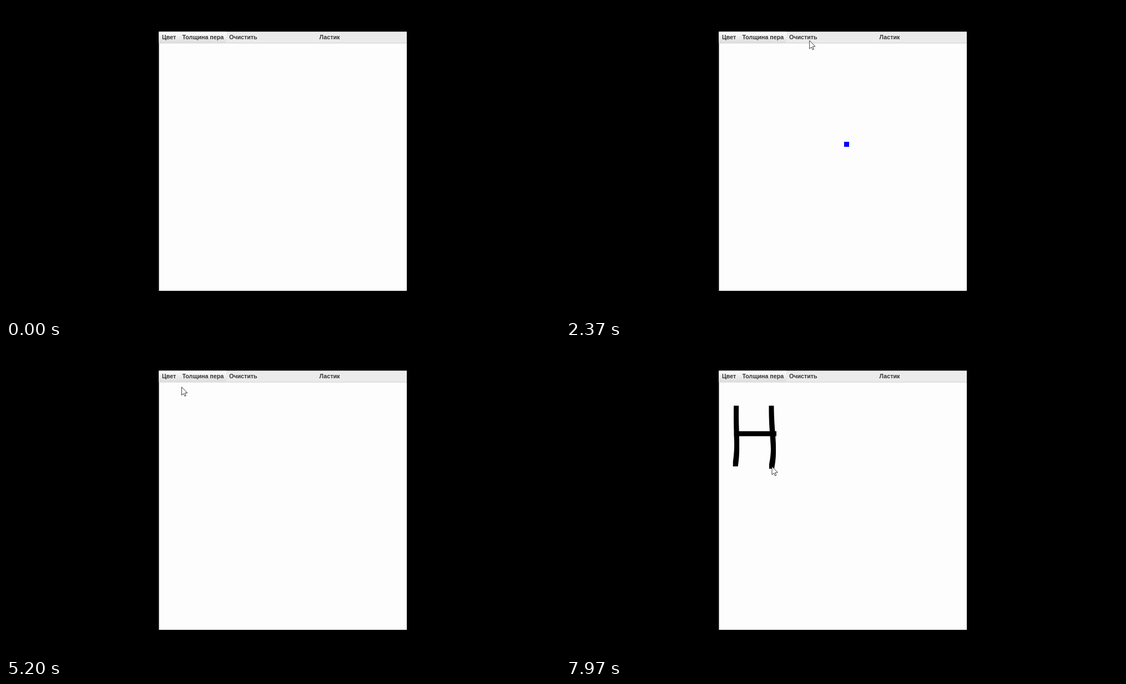
Animation, 998 px wide and 561 px high, one loop 8 s. Source, as an HTML page:

```html
<!DOCTYPE html>
<html lang="ru">
<head>
<meta charset="utf-8">
<title>Рисовалка</title>
<style>
  html, body { margin: 0; width: 100%; height: 100%; overflow: hidden; background: #000; }
  svg { display: block; width: 998px; height: 561px; }
  text { font: bold 10.7px "Liberation Sans", Arial, sans-serif; fill: #333; }
</style>
</head>
<body>
<svg viewBox="0 0 998 561">
  <defs>
    <linearGradient id="shine" x2="0" y2="1">
      <stop offset="0" stop-color="#fff"/>
      <stop offset=".35" stop-color="#f3f3f3"/>
      <stop offset="1" stop-color="#dedede"/>
    </linearGradient>
  </defs>
  <rect width="998" height="561"/>
  <rect x="275.5" y="46.5" width="446.5" height="467.3" fill="#fdfdfd"/>
  <rect x="275.5" y="46.5" width="446.5" height="20.5" fill="#ebebeb"/>
  <rect x="275.5" y="46.5" width="121.5" height="19.5" fill="url(#shine)"/>
  <rect x="275.5" y="66.5" width="446.5" height="1" fill="#d0d0d0"/>
  <rect id="dot" x="501" y="245" width="9" height="9" fill="#00f"/>
  <path id="ink"/>
  <g id="menu">
    <rect x="275.5" y="46.5" width="35.5" height="19.5" fill="#a0b5ca"/>
    <path d="M310.5 47v19" stroke="#7a8a99"/>
    <rect x="276" y="66.5" width="67.7" height="97" fill="#eee" stroke="#7f96bd"/>
    <g id="active">
      <rect x="276.5" y="68" width="67" height="18" fill="#a0b5ca"/>
      <path d="M276.5 68.5h67" stroke="#7f96bd"/>
    </g>
  </g>
  <g id="labels"></g>
  <g id="items"></g>
  <path id="cursor" fill="#fff" stroke="#222" stroke-width=".9" stroke-linejoin="round"
    d="M0 0V14.8L3.4 11.7 5.6 16.6 7.8 15.6 5.7 11 10.3 10.6Z"/>
</svg>
<script>
const LOOP = 8000;
const CLEAR = 2600, MENU_OPEN = 4380, MENU_CLOSE = 5150;
const BRUSH = 9;

// Where the hand is at each moment; pen marks a drawn stretch, sway bends it sideways
const stops = [
  { at: 670, x: 700, y: 420 },
  { at: 930, x: 505.5, y: 249.5 },
  { at: 1500, x: 325.5, y: 93.5 },
  { at: 1850, x: 330, y: 130 },
  { at: 2300, x: 438, y: 62 },
  { at: 2930, x: 444, y: 58 },
  { at: 3230, x: 444, y: 58 },
  { at: 3630, x: 431.5, y: 78.5 },
  { at: 4350, x: 291, y: 58 },
  { at: 4600, x: 313.5, y: 70.5 },
  { at: 5150, x: 316, y: 75 },
  { at: 6120, x: 306.7, y: 114 },
  { at: 6470, x: 305.3, y: 214.5, pen: true, sway: 1.9 },
  { at: 6680, x: 307, y: 160 },
  { at: 7030, x: 374.5, y: 160, pen: true },
  { at: 7310, x: 370, y: 114 },
  { at: 7970, x: 370.5, y: 218.8, pen: true, sway: 3.2 }
];
const [ENTER, CLICK] = stops.map(s => s.at);

const byId = id => document.getElementById(id);
const show = (id, on) => byId(id).setAttribute("visibility", on ? "visible" : "hidden");
const clamp = v => Math.min(1, Math.max(0, v));
const ease = k => k * k * (3 - 2 * k);

function addText(parent, label, x, y) {
  const node = document.createElementNS("http://www.w3.org/2000/svg", "text");
  node.setAttribute("x", x);
  node.setAttribute("y", y);
  node.textContent = label;
  byId(parent).append(node);
}

function pointOn(from, to, k) {
  const bend = (to.sway || 0) * Math.sin(Math.PI * k * k);
  return [from.x + (to.x - from.x) * k + bend, from.y + (to.y - from.y) * k];
}

const progress = (from, to, t) => ease(clamp((t - from.at) / (to.at - from.at)));

function pointerAt(t) {
  const next = stops.findIndex(s => s.at > t);
  const i = next < 0 ? stops.length - 1 : Math.max(1, next);
  return pointOn(stops[i - 1], stops[i], progress(stops[i - 1], stops[i], t));
}

// Sweeps the square brush along every pen stretch reached so far
function inkAt(t) {
  let d = "";
  stops.forEach((to, i) => {
    const from = stops[i - 1];
    if (!to.pen || t < from.at) return;
    const end = progress(from, to, t);
    const steps = Math.ceil(end * 100);
    for (let n = 0; n <= steps; n++) {
      const [x, y] = pointOn(from, to, Math.min(end, n / 100));
      d += `M${x - BRUSH / 2} ${y - BRUSH / 2}h${BRUSH}v${BRUSH}h-${BRUSH}z`;
    }
  });
  return d;
}

function draw(t) {
  const [x, y] = pointerAt(t);
  const open = t >= MENU_OPEN && t < MENU_CLOSE;
  show("dot", t >= CLICK && t < CLEAR);
  show("menu", open);
  show("items", open);
  show("active", open && y >= 67);
  show("cursor", t >= ENTER);
  byId("ink").setAttribute("d", inkAt(t));
  byId("cursor").setAttribute("transform", `translate(${x + 0.5} ${y + 0.5})`);
}

[["Цвет", 281], ["Толщина пера", 317.5], ["Очистить", 402], ["Ластик", 564.5]]
  .forEach(([label, x]) => addText("labels", label, x, 60));
["Чёрный", "Красный", "Синий", "Зелёный", "Жёлтый"]
  .forEach((label, i) => addText("items", label, 281.5, 81.5 + i * 18.8));

const start = performance.now();
function tick() {
  draw((performance.now() - start) % LOOP);
  requestAnimationFrame(tick);
}
tick();
</script>
</body>
</html>
```
